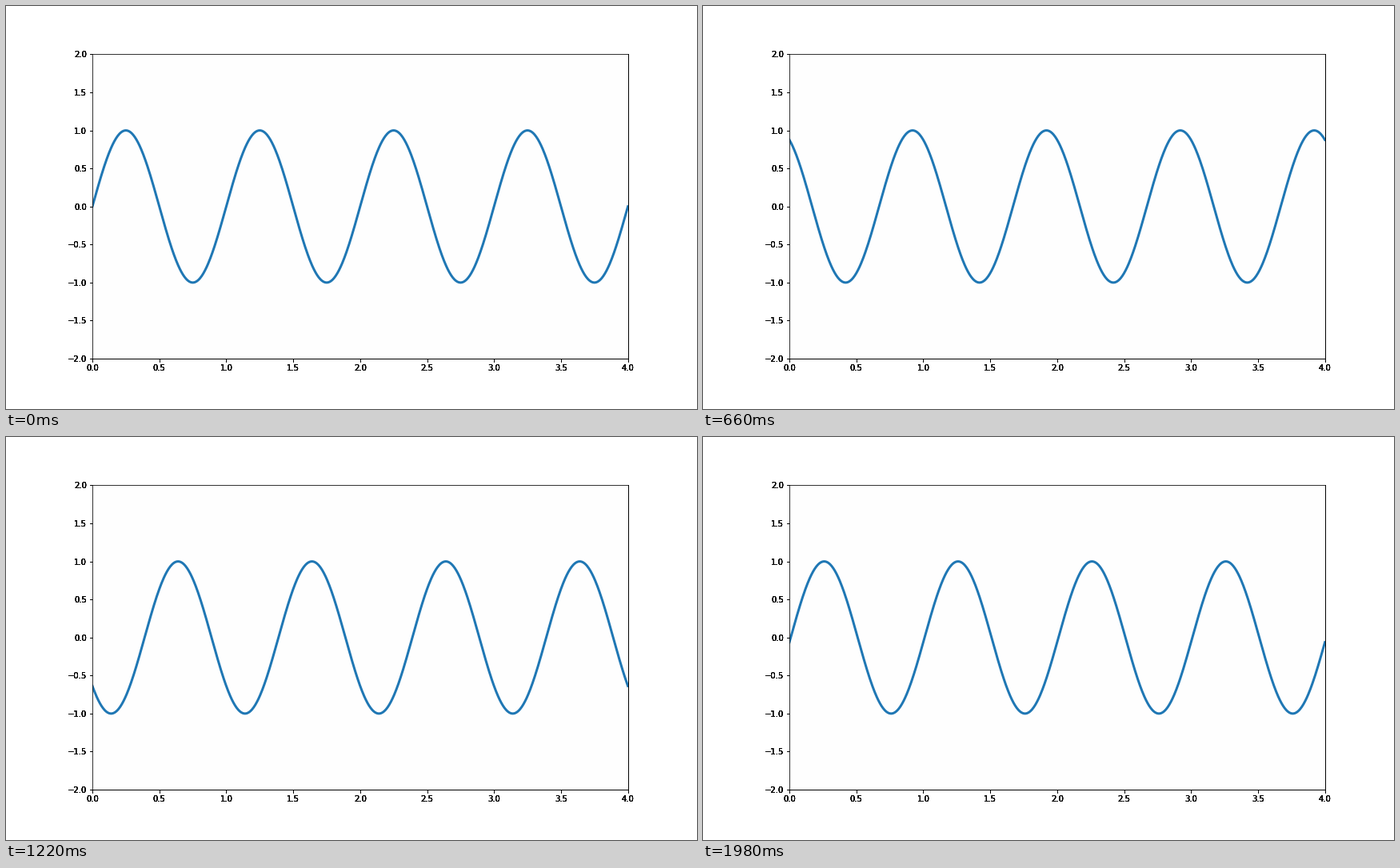
A matplotlib script that plays this animation: 864 px wide and 504 px high, repeating every 2000 ms.

```python
import numpy as np
import matplotlib.pyplot as plt
from matplotlib.animation import FuncAnimation

FRAMES = 100
LAYERS = 5  # stacked axes give the labels their heavy, saturated edges

plt.rcParams["font.family"] = "DejaVu Sans"
plt.rcParams["font.size"] = 10

fig = plt.figure(figsize=(12, 7), dpi=72, facecolor="white")


def add_layer():
    layer = fig.add_axes([0.125, 0.125, 0.775, 0.755], facecolor="#fefefe")
    layer.set(xlim=(0, 4), ylim=(-2, 2))
    return layer


ax = [add_layer() for _ in range(LAYERS)][-1]

x = np.linspace(0, 4, 1000)
line, = ax.plot(x, np.sin(2 * np.pi * x), color="#1f77b4", lw=3)


def update(i):
    line.set_ydata(np.sin(2 * np.pi * (x + i / FRAMES)))
    return line,


anim = FuncAnimation(fig, update, frames=FRAMES, interval=20,
                     repeat=True, repeat_delay=0)
plt.show()
```
